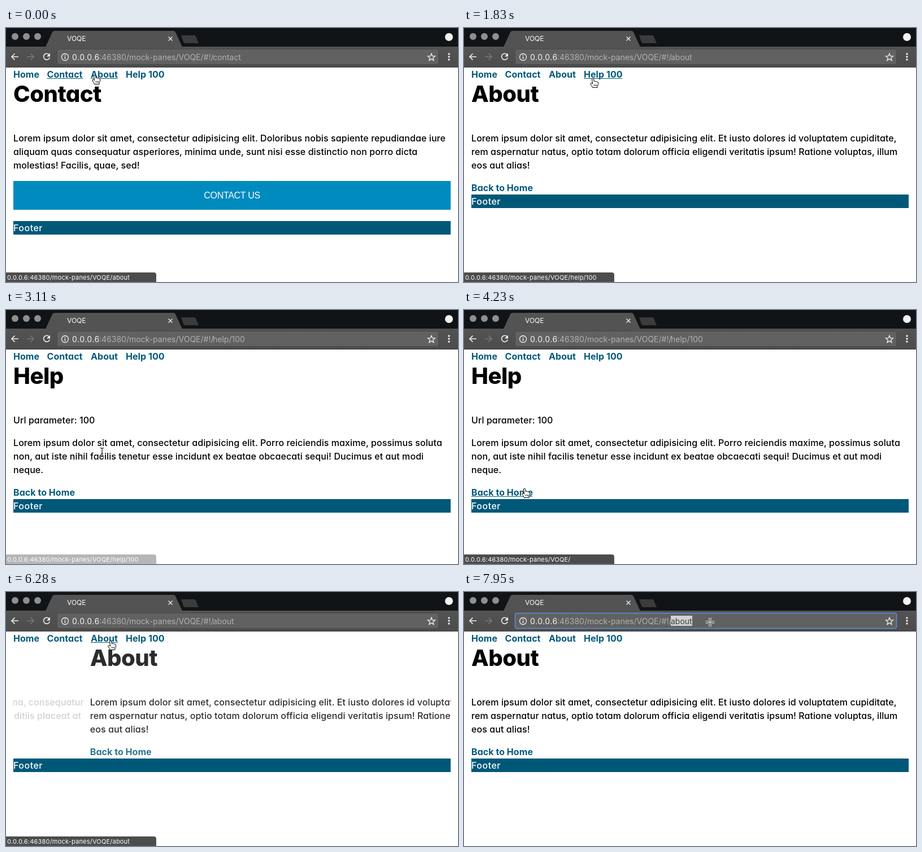
These frames come from a looping animation (800x450 px, 8000 ms). An HTML page:

```html
<!DOCTYPE html>
<html lang="en">
<head>
<meta charset="utf-8">
<title>Page transitions</title>
<style>
  html, body { margin: 0; width: 100%; height: 100%; overflow: hidden; background: #fff; }
  svg { display: block; width: 100vw; height: 100vh; }
  text { font-family: Inter, sans-serif; font-optical-sizing: none; white-space: pre; }
  .page text, .nav text, .foot text { font-size: 16px; font-feature-settings: "cv11"; }
  .page .body, .foot text { font-weight: 450; letter-spacing: .08px; }
  .foot text { letter-spacing: .5px; }
  .page .title { font-size: 40px; font-weight: 800; letter-spacing: -.5px; }
  .page .link, .nav .link { font-weight: 700; letter-spacing: .05px; fill: #005a7c; }
  .page .button { font-family: "Liberation Sans", Arial, sans-serif; letter-spacing: -.3px; fill: #fff; }
  .url { font-size: 14px; fill: #b1b1b1; }
  .host { fill: #f6f6f6; letter-spacing: .5px; }
  .status { font-size: 11px; letter-spacing: .2px; fill: #fff; }
  .line { fill: none; stroke: #f1f1f1; stroke-width: 1.6; }
  .thin { stroke-width: 1.3; }
</style>
</head>
<body>
<svg viewBox="0 0 800 450" preserveAspectRatio="xMinYMin meet">
  <defs>
    <clipPath id="view"><rect id="viewBox" x="13" y="94" width="774" height="248"/></clipPath>
    <linearGradient id="bar" x1="0" y1="0" x2="0" y2="1">
      <stop offset="0" stop-color="#535353"/><stop offset="1" stop-color="#4c4c4c"/>
    </linearGradient>
    <path id="beamShape" d="M-3.5-8Q0-8 0-6V6Q0 8 3.5 8M3.5-8Q0-8 0-6V6Q0 8-3.5 8M-2 2H2"/>
  </defs>
  <rect width="800" height="450" fill="#fff"/>

  <!-- browser window -->
  <rect width="800" height="34" fill="#101416"/>
  <g fill="#8f8f8f"><circle cx="16" cy="15" r="6"/><circle cx="36" cy="15" r="6"/><circle cx="56" cy="15" r="6"/></g>
  <path d="M70 33.5L82 7.5Q83 5 86 5H296Q299 5 300 7.5L312 33.5Z" fill="#535353"/>
  <path d="M310 13H333Q335 13 336 15L341 27H317Q315 27 314 25Z" fill="#3c3c3c"/>
  <text x="108" y="23" font-size="12" fill="#fff">VOQE</text>
  <path class="line thin" d="M287.5 15.500l7 7m0-7l-7 7"/>
  <circle cx="784" cy="16" r="7" fill="#f3f3f3"/>
  <rect y="33" width="800" height="37" fill="url(#bar)"/>
  <rect y="69" width="800" height="1" fill="#3e3e3e"/>
  <path class="line" d="M22 51H10M15.5 45.500L10 51L15.5 56.500"/>
  <path class="line" style="stroke:#787878" d="M37 51H49M43.5 45.500L49 51L43.5 56.500"/>
  <path class="line" d="M76.5 47.500A5.5 5.5 0 1 0 77.3 52.500"/>
  <path d="M78 44.500V50.500H72Z" fill="#f1f1f1"/>
  <rect id="field" x="90.5" y="37.5" width="675" height="27" rx="3" fill="#616161"/>
  <circle class="line thin" cx="104.5" cy="51.5" r="6"/>
  <path class="line" d="M104.5 48v1.500m0 1.300v4"/>
  <rect id="mark" x="366" y="42" width="38" height="18" fill="#d2d2d2"/>
  <text class="url" x="117" y="57"><tspan class="host" id="host"></tspan><tspan id="path" x="165"></tspan><tspan id="route" x="366"></tspan></text>
  <path id="star" class="line thin"/>
  <g fill="#f1f1f1"><circle cx="784" cy="46" r="1.7"/><circle cx="784" cy="51" r="1.7"/><circle cx="784" cy="56" r="1.7"/></g>

  <!-- web page -->
  <g class="nav" id="nav"></g>
  <g clip-path="url(#view)" id="pages"></g>
  <g class="foot" id="foot">
    <rect x="13" width="774" height="24" fill="#005879"/>
    <text x="13" y="18" fill="#fff">Footer</text>
  </g>
  <g id="status">
    <path d="M0 433.500H262.500Q265.5 433.500 265.5 437V450H0Z" fill="#4c4c4c" stroke="#5c5c5c"/>
    <text class="status" id="statusText" x="2" y="446"></text>
  </g>

  <!-- pointers, origin at the hot spot -->
  <g id="pointer">
    <path id="arrow" d="M0 0V14L3.2 11L5.6 16.200L8 15.200L5.7 10.100H10Z" fill="#000" stroke="#fff"/>
    <g id="hand" stroke="#000" stroke-linejoin="round">
      <path d="M-1.5 1Q0-.8 1.5 1L2.2 5.500Q4 4.300 4.9 6Q6.7 5 7.4 6.700Q9.5 6 9.7 8.500Q9.8 12 8 14V16.500H-.5Q-1.5 13.500-3.8 11Q-4.8 9-3.3 8.500Q-1.7 8.400-.5 10Z" fill="#fff"/>
      <path d="M2.2 11v3M4.4 11v3M6.5 11v3" stroke-width=".8"/>
    </g>
    <g id="beam" fill="none">
      <use href="#beamShape" stroke="#fff" stroke-width="2.6"/>
      <use href="#beamShape" stroke="#111" stroke-width="1.1"/>
    </g>
    <g id="cross">
      <path d="M-7.5 0H7.500M0-7.500V7.500" stroke="#fff" stroke-width="5"/>
      <path d="M-6.8 0H6.800M0-6.800V6.800" stroke="#111" stroke-width="3.4"/>
      <path d="M-5.8 0H5.800M0-5.800V5.800" stroke="#fff" stroke-width="1.4"/>
    </g>
  </g>
</svg>
<script>
const LOOP = 8000, SLIDE = 600, WIDTH = 774, LEFT = 13;
const HOST = '0.0.0.6', PATH = ':46380/mock-panes/VOQE/';
const $ = id => document.getElementById(id);

function el(parent, tag, attrs, text) {
  const node = document.createElementNS('http://www.w3.org/2000/svg', tag);
  for (const k in attrs) node.setAttribute(k, attrs[k]);
  if (text) node.textContent = text;
  return parent.appendChild(node);
}
const show = (node, on) => node.setAttribute('visibility', on ? 'visible' : 'hidden');
const clamp = v => Math.max(0, Math.min(1, v));
const ramp = (t, a, b) => clamp((t - a) / (b - a));
const within = (t, ...spans) => spans.some(([a, b]) => t >= a && t < b);

// CSS "ease": cubic-bezier(.25, .1, .25, 1)
function ease(x) {
  if (x <= 0 || x >= 1) return clamp(x);
  const curve = (s, a, b) => 3 * (1 - s) * (1 - s) * s * a + 3 * (1 - s) * s * s * b + s ** 3;
  let lo = 0, hi = 1;
  for (let i = 0; i < 24; i++) {
    const mid = (lo + hi) / 2;
    if (curve(mid, .25, .25) < x) lo = mid; else hi = mid;
  }
  return curve(lo, .1, 1);
}

const LOREM = 'Lorem ipsum dolor sit amet, consectetur adipisicing elit. ';
const PAGES = {
  contact: { title: 'Contact', route: '#!/contact', foot: 342, button: true, lines: [
    [201, LOREM + 'Doloribus nobis sapiente repudiandae iure'],
    [225, 'aliquam quas consequatur asperiores, minima unde, sunt nisi esse distinctio non porro dicta'],
    [249, 'molestias! Facilis, quae, sed!']] },
  about: { title: 'About', route: '#!/about', foot: 295, back: 289, lines: [
    [201, LOREM + 'Et iusto dolores id voluptatem cupiditate,'],
    [225, 'rem aspernatur natus, optio totam dolorum officia eligendi veritatis ipsum! Ratione voluptas, illum'],
    [249, 'eos aut alias!']] },
  help: { title: 'Help', route: '#!/help/100', foot: 335, back: 329, lines: [
    [201, 'Url parameter: 100'],
    [241, LOREM + 'Porro reiciendis maxime, possimus soluta'],
    [265, 'non, aut iste nihil facilis tenetur esse incidunt ex beatae obcaecati sequi! Ducimus et aut modi'],
    [289, 'neque.']] },
  home: { title: 'Home', route: '', foot: 255, lines: [
    [201, LOREM + 'Doloribus et adipisci minima, consequatur'],
    [225, 'odit odio neque nesciunt dolor, totam modi eligendi iusto tempore alias earum blanditiis placeat at'],
    [249, 'delectus consectetur?']] }
};

for (const p of Object.values(PAGES)) {
  p.node = el($('pages'), 'g', { class: 'page' });
  el(p.node, 'text', { class: 'title', x: LEFT, y: 131 }, p.title);
  for (const [y, s] of p.lines) el(p.node, 'text', { class: 'body', x: LEFT, y }, s);
  if (p.back) el(p.node, 'text', { class: 'link', x: LEFT, y: p.back }, 'Back to Home');
  if (p.button) {
    el(p.node, 'rect', { x: LEFT, y: 271, width: WIDTH, height: 51, fill: '#008bbf' });
    el(p.node, 'text', { class: 'button', x: 400, y: 302, 'text-anchor': 'middle' }, 'CONTACT US');
  }
}

const underline = (parent, x, y, width) => el(parent, 'rect', { x, y, width, height: 1, fill: '#005a7c' });
function navLink(label, x, width) {
  el($('nav'), 'text', { class: 'link', x, y: 88 }, label);
  return underline($('nav'), x, 89, width);
}
// each underline with the spans of time in which it shows
const UNDERLINES = [
  [navLink('Home', 13, 45)],
  [navLink('Contact', 72.5, 64), [0, 120]],
  [navLink('About', 150, 48), [0, 1492], [5740, 6740]],
  [navLink('Help 100', 212, 68), [1538, 2760]],
  [underline(PAGES.help.node, LEFT, 330, 108), [3520, 4345]]
];

let star = '';
for (let i = 0; i < 10; i++) {
  const a = i * Math.PI / 5, r = i % 2 ? 2.9 : 6.8;
  star += (i ? 'L' : 'M') + (753 + r * Math.sin(a)) + ' ' + (52 - r * Math.cos(a));
}
$('star').setAttribute('d', star + 'Z');
$('host').textContent = HOST;

// page, time it is opened, time its slide starts
const VISITS = [
  ['contact', -9999, -9999], ['about', 260, 251], ['help', 2055, 2102],
  ['home', 4345, 4340], ['about', 5960, 5967]
];
// text, fade in from/to, fade out from/to
const HINTS = [
  ['about', -2, -1, 1515, 1516], ['help/100', 1514, 1515, 2980, 3200],
  ['', 3600, 3750, 5185, 5412], ['about', 5830, 5950, 6960, 7160]
];
const MOVES = [
  [0, 157, 83], [1290, 157, 83], [1640, 228, 89], [2740, 228, 89], [2900, 190, 232],
  [3560, 107, 316], [5010, 107, 316], [5260, 185, 117], [5420, 185, 117],
  [5760, 185, 86], [6690, 185, 86], [7300, 435.5, 53.5], [LOOP, 435.5, 53.5]
];
const SHAPES = [
  [0, 'hand'], [1492, 'arrow'], [1538, 'hand'], [2760, 'arrow'], [2880, 'beam'], [3300, 'arrow'],
  [3520, 'hand'], [5040, 'arrow'], [5740, 'hand'], [6740, 'arrow'], [7120, 'beam'], [7770, 'cross']
];
const latest = (list, t, col = 0) => list.reduce((n, row, i) => row[col] <= t ? i : n, 0);

function place(page, x, alpha) {
  page.node.setAttribute('transform', `translate(${x} 0)`);
  page.node.setAttribute('opacity', alpha);
}

function drawPages(t) {
  const n = latest(VISITS, t, 1), page = PAGES[VISITS[n][0]];
  const p = ease((t - VISITS[n][2]) / SLIDE);
  for (const other of Object.values(PAGES)) place(other, 0, 0);
  if (n) place(PAGES[VISITS[n - 1][0]], -p * WIDTH, 1 - p);
  place(page, (1 - p) * WIDTH, p);
  $('viewBox').setAttribute('height', page.foot - 94);
  $('foot').setAttribute('transform', `translate(0 ${page.foot})`);

  const cut = page.route ? 3 : 0;
  $('path').textContent = PATH + page.route.slice(0, cut);
  $('route').textContent = page.route.slice(cut);
}

function drawStatus(t) {
  const [text, a, b, c, d] = HINTS[latest(HINTS, t, 1)];
  $('statusText').textContent = HOST + PATH + text;
  $('status').setAttribute('opacity', ramp(t, a, b) * (1 - ramp(t, c, d)));
}

function drawPointer(t) {
  const i = Math.min(latest(MOVES, t), MOVES.length - 2);
  const [ta, xa, ya] = MOVES[i], [tb, xb, yb] = MOVES[i + 1];
  const u = ramp(t, ta, tb), s = u * u * (3 - 2 * u);
  $('pointer').setAttribute('transform', `translate(${xa + (xb - xa) * s} ${ya + (yb - ya) * s})`);
  const shape = SHAPES[latest(SHAPES, t)][1];
  for (const id of ['arrow', 'hand', 'beam', 'cross']) show($(id), id === shape);
}

function drawField(t) {
  const focus = t >= 7400, picked = t >= 7950;
  $('field').setAttribute('stroke', focus ? '#5b8fe0' : '#4a4a4a');
  $('field').setAttribute('stroke-width', focus ? 1.5 : 1);
  show($('mark'), picked);
  $('route').style.fill = picked ? '#3c3c3c' : '';
}

function draw(t) {
  drawPages(t);
  for (const [node, ...spans] of UNDERLINES) show(node, within(t, ...spans));
  drawStatus(t);
  drawPointer(t);
  drawField(t);
}

const begin = performance.now();
function tick() {
  draw((performance.now() - begin) % LOOP);
  requestAnimationFrame(tick);
}
draw(0);
requestAnimationFrame(tick);
</script>
</body>
</html>
```
